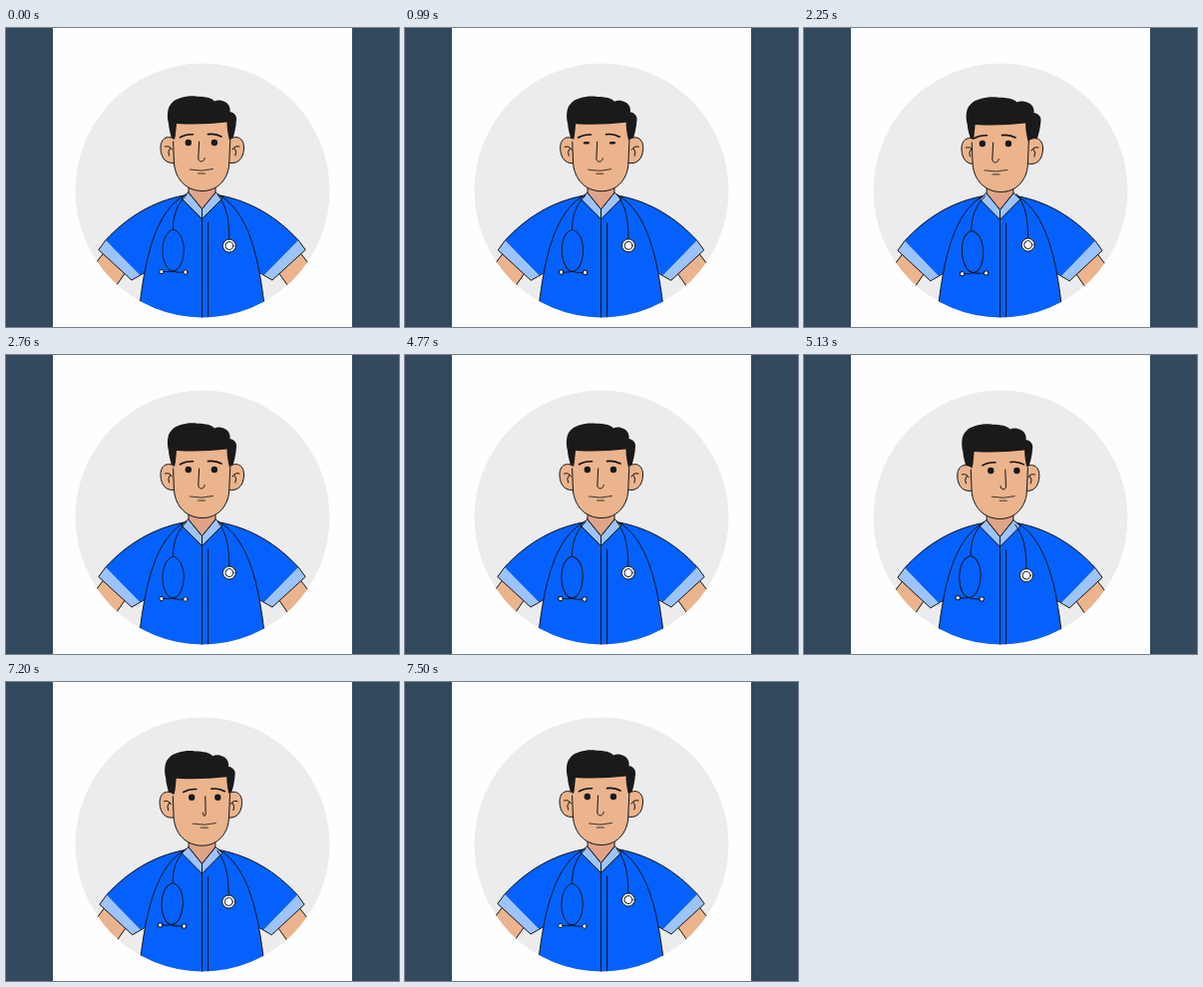
Recreate the animation shown at these times as an HTML page. Size 394x300 px, loop 8070 ms.

```html
<!DOCTYPE html>
<html lang="en">
<head>
<meta charset="utf-8">
<title>Friendly nurse</title>
<style>
/* --r: turn to one side, --l: turn to the other, --open: eyelids */
@property --r { syntax: "<number>"; inherits: true; initial-value: 0; }
@property --l { syntax: "<number>"; inherits: true; initial-value: 0; }
@property --open { syntax: "<number>"; inherits: true; initial-value: 1; }

html, body { margin: 0; width: 100%; height: 100%; overflow: hidden; background: #fefefe; }
svg {
  display: block; width: 100%; height: 100%;
  --turn: calc(var(--r) + var(--l));
  --lean: calc(var(--turn) * (2 - var(--turn)));
  animation: right 8070ms infinite, left 8070ms infinite, blink 8070ms linear infinite;
}
path, circle, ellipse { stroke: #111418; stroke-width: 1; stroke-linejoin: round; stroke-linecap: round; }
.flat { stroke: none; }
.line { fill: none; }
.skin { fill: #ebb48d; }
.shade { fill: #e0a387; }
.blue { fill: #0561fe; }
.trim { fill: #9dc3fc; }
.ink { fill: #1a1a1a; }
.white { fill: #fff; }

/* each part drifts by its own amount for either turn */
.part {
  --dx: calc((var(--r) * var(--rx, 0) + var(--l) * var(--lx, 0)) * 1px);
  --dy: calc((var(--r) * var(--ry, 1) + var(--l) * var(--ly, 1)) * 1px);
  transform: translate(var(--dx), var(--dy));
}
.hair {
  transform-origin: 162px 0;
  transform: translate(var(--dx), var(--dy)) scaleX(calc(1 + .084 * var(--r) + .03 * var(--l)));
}
.nose {
  transform-origin: 194px 0;
  transform: translate(var(--dx), var(--dy)) scaleX(calc(1 - 2 * var(--l)));
}
.nose path { vector-effect: non-scaling-stroke; }
.body {
  transform-origin: 196.5px 0;
  transform: translateY(calc(var(--lean) * .8px)) scaleX(calc(1 - .011 * var(--lean)));
}
.loop {
  transform-origin: 167.5px 202px;
  transform: rotate(calc(var(--l) * 2deg - var(--r) * 3deg));
}
.eyes ellipse { transform-origin: 0 115px; transform: scaleY(var(--open)); }

@keyframes right {
  0%, 10.04% { --r: 0; animation-timing-function: cubic-bezier(.33, 0, .2, 1); }
  20.45%, 27.51% { --r: 1; animation-timing-function: cubic-bezier(.42, 0, .58, 1); }
  34.2%, 100% { --r: 0; }
}
@keyframes left {
  0%, 58.74% { --l: 0; animation-timing-function: cubic-bezier(.42, 0, .58, 1); }
  64.68%, 86.99% { --l: 1; animation-timing-function: cubic-bezier(.42, 0, .58, 1); }
  92.94%, 100% { --l: 0; }
}
@keyframes blink {
  0%, 10.78%, 13.01%, 40.52%, 43.12%, 69.14%, 71.38%, 76.58%, 78.81%, 100% { --open: 1; }
  11.9%, 41.7%, 70.26%, 77.7% { --open: .1; }
}
</style>
</head>
<body>
<svg viewBox="0 0 394 300" preserveAspectRatio="none">
  <defs>
    <clipPath id="disc"><circle cx="197" cy="163" r="127.5"/></clipPath>
    <g id="arm">
      <path class="skin" d="M100 223 L83 245 L101 272 L120 245Z"/>
      <path class="blue flat" d="M178 168 C147 174 121 190 99.800 213 L134 248 L145 242 L165 190Z"/>
      <path class="trim flat" d="M99.800 213 L92.800 222.500 L126 253 L134 248Z"/>
      <path class="line" d="M178 168 C147 174 121 190 99.800 213 L92.800 222.500 L126 253 L139 245.500"/>
    </g>
    <path id="collar" class="trim" d="M182.500 165 L176 171 L196.500 191.500 V182Z"/>
  </defs>

  <rect width="394" height="300" fill="#fefefe"/>
  <circle class="flat" cx="197" cy="163" r="127.5" fill="#ececec"/>

  <g clip-path="url(#disc)">
    <g class="body">
      <use href="#arm"/>
      <use href="#arm" transform="matrix(-1 0 0 1 393 0)"/>
      <path class="blue" d="M180 167 C150 184 139 228 132.500 292 H260.500 C254 228 243 184 213 167Z"/>
      <path class="line" d="M196.500 191 V300 M202.600 195 V300"/>
      <path class="shade" d="M183 150 V165.500 L196.500 182 L210 165.500 V150Z"/>
      <use href="#collar"/>
      <use href="#collar" transform="matrix(-1 0 0 1 393 0)"/>
    </g>
    <g class="part" style="--rx:.4;--ry:1.600;--lx:-.5;--ly:-.5">
      <path class="line" d="M181 167.500 C171 177 167.500 188 167.500 202"/>
      <g class="loop">
        <path class="line" d="M167.500 202 C154.500 206 154 233 163 242 C168 245.500 174 245.500 180 245
          M167.500 202 C181 206 181 233 172 242 C167 245 161 245 156 244"/>
        <circle class="white" cx="156" cy="244.500" r="2.200"/>
        <circle class="white" cx="180" cy="245" r="2.200"/>
      </g>
    </g>
    <g class="part" style="--rx:.8;--ry:-1;--lx:-.9;--ly:2.800">
      <path class="line" d="M212.500 167.500 C220.500 178 223.800 190 223.800 212"/>
      <circle class="white" cx="223.900" cy="218.500" r="6.500"/>
      <circle class="white" cx="223.900" cy="218.500" r="4"/>
    </g>
  </g>

  <g class="part hair" style="--rx:.7;--lx:-4">
    <path class="ink flat" d="M166.500 114 C165.500 107 163.500 103 163 96 C161.500 90 161 80 166 75.500
      C172 69 184 67.500 192 68.800 C200 69 206 70 209 73.500 C213 71 222 73 224 79
      Q225 82 224.500 84 C229 85 231.500 88 231 92 C230.500 100 229 106 226.500 114Z"/>
  </g>
  <g class="part" style="--rx:3;--lx:-1.300">
    <path class="skin" d="M171 113 C163 106 154.500 110 155 121 C155.500 131 161 137.500 171 135"/>
    <path class="line" d="M159.500 119 Q164 117.500 166.500 122 M164.500 120.500 Q161.500 124 163.500 128"/>
  </g>
  <g class="part" style="--rx:1;--lx:-2.800">
    <path class="skin" d="M222.500 113 C230.500 106 239 110 238.500 121 C238 131 232.500 137.500 222.500 135"/>
    <path class="line" d="M234 119 Q229.500 117.500 227 122 M229 120.500 Q232 124 230 128"/>
  </g>
  <g class="part" style="--rx:.6;--lx:-.4">
    <path class="skin flat" d="M167.600 118 Q170.500 108 171 96 Q196 97.500 221.500 94.500
      Q221.500 105 225 116 L223.700 137 C222.500 152 212 163.500 197 163.500
      C181 163.500 170 152 168.500 136Z"/>
    <path class="line" d="M167.600 114 L168.500 136 C170 152 181 163.500 197 163.500
      C212 163.500 222.500 152 223.700 137 L224.800 112"/>
  </g>

  <g class="part" style="--rx:-4;--lx:4.800">
    <path class="line" style="stroke-width:1.600" d="M174.500 109.800 Q180 106.500 187.500 106.800 M202.500 106.600 Q210 105.500 216 109"/>
    <g class="eyes">
      <ellipse class="ink flat" cx="182.800" cy="115" rx="3.200" ry="3.200"/>
      <ellipse class="ink flat" cx="208.900" cy="115" rx="3.200" ry="3.200"/>
    </g>
  </g>
  <g class="part nose" style="--rx:-4;--lx:8">
    <path class="line" d="M193.600 114 L192.800 131 C193 135 199 135 199.200 130.500"/>
  </g>
  <g class="part" style="--rx:-3.500;--ry:.9;--lx:4;--ly:.2">
    <path class="line" stroke-opacity=".8" d="M184.500 142 Q196 144.500 207.500 141.500 M192.500 146 H199.500"/>
  </g>

  <path class="flat" fill="#32495e" d="M0 0 H47 V300 H0Z M347 0 H394 V300 H347Z"/>
</svg>
</body>
</html>
```
